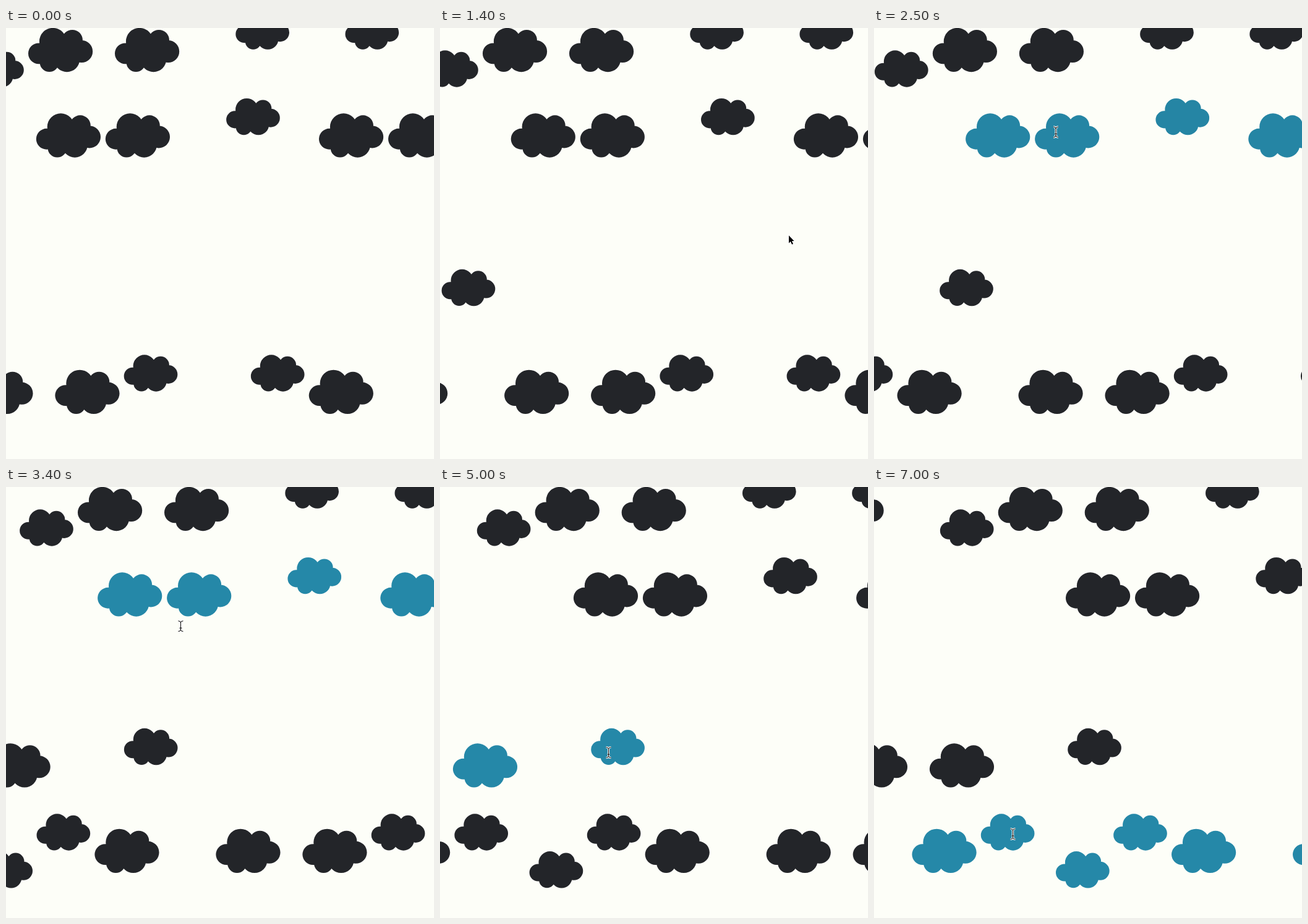
These frames come from a looping animation (692x698 px, 7100 ms). An HTML page with a canvas:

```html
<!DOCTYPE html>
<html lang="en">
<head>
<meta charset="utf-8">
<title>Drifting clouds</title>
<style>
  html, body { margin: 0; width: 100%; height: 100%; overflow: hidden; background: #fdfef8; }
  canvas { display: block; }
</style>
</head>
<body>
<canvas id="stage" width="692" height="698"></canvas>
<script>
const ctx = document.getElementById('stage').getContext('2d');
const LOOP = 7100, STEP = 100, FADE = 0.5;
const LANE_HEIGHT = 138.45, LANE_SPEED = 23.53, EM = 112;
const BACKGROUND = '#fdfef8', DARK = [35, 37, 41], BLUE = [37, 136, 168];

// Cloud lobes, clockwise: centre x, centre y, radius
const LOBES = [
  [39.6, 21.8, 21.9], [71, 19.7, 16.8], [86, 38, 18],
  [62.3, 50.5, 20.7], [33.9, 55.7, 15.4], [16.7, 41.3, 16.9]
];
const cloud = new Path2D();
LOBES.forEach(([x, y]) => cloud.lineTo(x, y));
cloud.closePath();
for (const [x, y, r] of LOBES) {
  cloud.moveTo(x + r, y);
  cloud.arc(x, y, r, 0, 2 * Math.PI);
}

// Each lane is a line of glyphs: big cloud, small raised, small lowered, space
const GLYPHS = {
  B: { scale: 1, rise: 0 },
  s: { scale: 0.832, rise: -24.4 },
  l: { scale: 0.832, rise: 36.4 },
  ' ': { scale: 0.25 }
};

// Lane i drifts at (i + 1) times the base speed, halts while hovered (pause to resume, in seconds)
const lanes = [
  { text: 'B   lB B   s   s', x: -257.2 },
  { text: 'BB   s  BB', x: 44.8, pause: 2.11, resume: 3.56 },
  { text: '' },
  { text: 'B B    s', x: -496.5, pause: 3.967, resume: 6.267, untint: 5.96 },
  { text: 'Bs lsB   B Bs    sB', x: -680.2, pause: 6.27 }
];

// Pointer key points: time, x, y
const POINTER = [
  [0.9, 704, 400], [1.4, 564, 336], [2.5, 294, 168.5], [3.3, 285, 200],
  [4.1, 264.5, 403], [5, 272.5, 430], [6.1, 232, 514], [7, 224.5, 562]
];
const arrow = new Path2D('M0 0V12.5L2.8 9.8 5 14.6 7 13.7 4.9 9.1H8.6Z');
const beam = new Path2D('M-4-8.5Q0-8.5 0-5.5Q0-8.5 4-8.5M0-6V6M-4 8.5Q0 8.5 0 5.5Q0 8.5 4 8.5M-2 3H2');

const clamp = (v, lo, hi) => Math.min(hi, Math.max(lo, v));
const mix = (a, b, k) => a + (b - a) * k;
const bezier = (s, a, b) => 3 * (1 - s) ** 2 * s * a + 3 * (1 - s) * s * s * b + s ** 3;

// CSS "ease" curve, solved by bisection
function ease(x) {
  x = clamp(x, 0, 1);
  let lo = 0, hi = 1;
  for (let i = 0; i < 20; i++) {
    const mid = (lo + hi) / 2;
    if (bezier(mid, 0.25, 0.25) < x) lo = mid; else hi = mid;
  }
  return bezier(hi, 0.1, 1);
}

function drawLane({ text, x, pause = 9, resume = 9, untint = resume }, i, t) {
  const moving = t - clamp(t - pause, 0, resume - pause);
  const tint = ease((t - pause) / FADE) - ease((t - untint) / FADE);
  ctx.fillStyle = `rgb(${DARK.map((c, n) => Math.round(mix(c, BLUE[n], tint)))})`;
  x += LANE_SPEED * (i + 1) * moving;
  for (const char of text) {
    const { scale, rise } = GLYPHS[char];
    if (char !== ' ') {
      ctx.save();
      ctx.translate(x, i * LANE_HEIGHT + rise);
      ctx.scale(scale, scale);
      ctx.translate(4.2, 0);
      ctx.fill(cloud);
      ctx.restore();
    }
    x += EM * scale;
  }
}

function outlined(path, halo) {
  ctx.strokeStyle = '#fff';
  ctx.lineWidth = halo;
  ctx.stroke(path);
}

function drawPointer(t) {
  const next = POINTER.findIndex(p => p[0] >= t);
  if (next < 1) return;
  const [t0, x0, y0] = POINTER[next - 1], [t1, x1, y1] = POINTER[next];
  const k = (t - t0) / (t1 - t0);
  ctx.save();
  ctx.translate(mix(x0, x1, k), mix(y0, y1, k));
  if (t < lanes[1].pause) {
    outlined(arrow, 1.5);
    ctx.fillStyle = '#000';
    ctx.fill(arrow);
  } else {
    outlined(beam, 3.2);
    ctx.strokeStyle = '#000';
    ctx.lineWidth = 1;
    ctx.stroke(beam);
  }
  ctx.restore();
}

const start = performance.now();
function draw() {
  const elapsed = (performance.now() - start) % LOOP;
  const t = Math.floor(elapsed / STEP) * STEP / 1000;
  ctx.fillStyle = BACKGROUND;
  ctx.fillRect(0, 0, 692, 698);
  lanes.forEach((lane, i) => drawLane(lane, i, t));
  drawPointer(t);
  requestAnimationFrame(draw);
}
draw();
</script>
</body>
</html>
```
